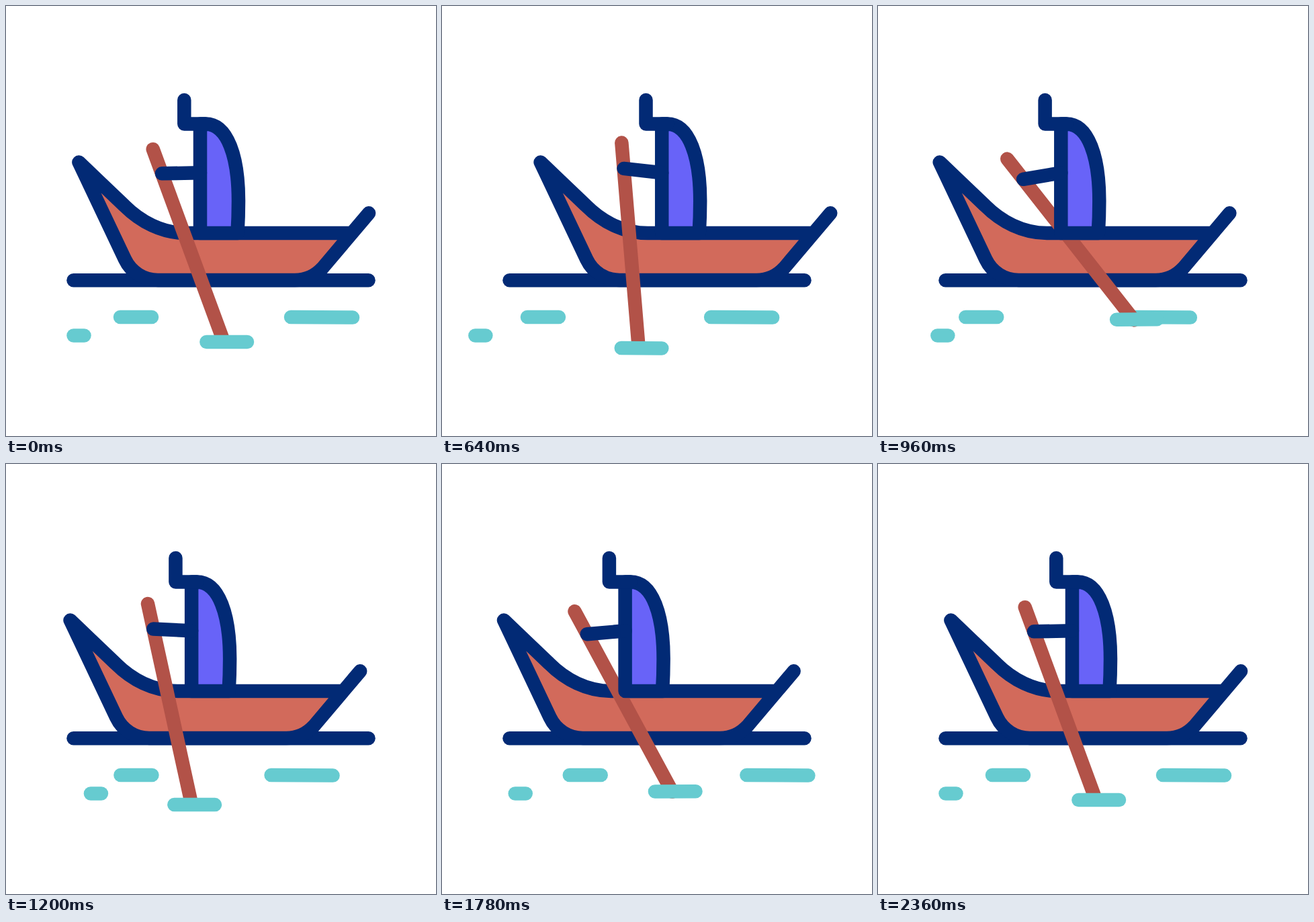
Animation, 640 px wide and 640 px high, one loop 2400 ms. Source, as an HTML page:

```html
<!DOCTYPE html>
<html lang="en">
<head>
<meta charset="utf-8">
<title>Rowing boat</title>
<style>
  html, body { margin: 0; height: 100%; overflow: hidden; background: #fff; }
  svg { display: block; width: 100vw; height: 100vh; }
  path { fill: none; stroke: #022a75; stroke-width: 20.5; stroke-linecap: round; stroke-linejoin: round; }
  .water { stroke: #66cbd0; }
  .wood { stroke: #b25248; }
</style>
</head>
<body>
<svg viewBox="0 0 640 640">
  <path class="water wave" d="M100.5 490.5H116.5"/>
  <path class="water wave" d="M170 463H217"/>
  <path class="water wave" d="M424 463L516 463.6"/>
  <path d="M100.5 408.3H539.5"/>
  <g id="boat">
    <path style="fill:#d26a5b;stroke:none" d="M108.5 232.5L177 377C186 396 205 408 226 408H430C446 408 461 401 471 390L515 338H268C232 338 200 321 176 297Z"/>
    <path d="M512 338H268C232 338 200 321 176 297L108.5 232.5L177 377C186 396 205 408 226 408H430C446 408 461 401 471 390L540 308.3"/>
    <path id="oar" class="wood" d="M0 -38.5V266.5"/>
    <path style="fill:#6863f8" d="M289 338V175.5H297C330 175.5 346 225 346 290Q346 314 344.5 338Z"/>
    <path d="M265.3 140V175.5H297"/>
    <path id="arm" d="M0 0H-57"/>
    <path id="splash" class="water" d="M-30.3 0H30.3"/>
  </g>
</svg>
<script>
const FRAME = 20, FRAMES = 120, RAD = Math.PI / 180;
const $ = id => document.getElementById(id);
const waves = document.querySelectorAll('.wave');

// Keys are [frame, value] pairs, eased in and out between neighbours.
const boatKeys = [[0, 0], [27.8, 43.7], [51.3, -20], [73, 0], [95, -20], [118, 0]];
const oarKeys = [[0, 21.1], [20.5, -14], [48.5, 39.1], [72, -14], [95.5, 39.1], [118, 21.1]];
const waveKeys = [[0, 0], [31.5, -51.2], [66, 32], [100.5, 0]];
const waveDelay = 8.5;

function valueAt(keys, frame) {
  if (frame <= keys[0][0]) return keys[0][1];
  for (let i = 1; i < keys.length; i++) {
    const [start, from] = keys[i - 1], [end, to] = keys[i];
    if (frame < end) {
      const s = (frame - start) / (end - start);
      return from + (to - from) * s * s * (3 - 2 * s);
    }
  }
  return keys[keys.length - 1][1];
}

function place(el, x, y, angle = 0) {
  el.setAttribute('transform', `translate(${x} ${y}) rotate(${angle})`);
}

function draw(now) {
  const frame = now / FRAME % FRAMES;
  waves.forEach((wave, i) => place(wave, valueAt(waveKeys, frame - i * waveDelay), 0));
  place($('boat'), valueAt(boatKeys, frame), 0);

  const swing = valueAt(oarKeys, frame);
  const lift = 1 + 0.48 * (swing - 21.1);
  const handX = 289 - 57 * Math.cos(lift * RAD);
  const handY = 248.3 + 57 * Math.sin(lift * RAD);
  place($('arm'), 289, 248.3, -lift);
  place($('oar'), handX, handY, 0.9 - swing);
  place($('splash'),
    handX + 268.6 * Math.sin(swing * RAD),
    handY + 268.6 * Math.cos(swing * RAD),
    (21.1 - swing) * 0.025);
  requestAnimationFrame(() => draw(performance.now()));
}
draw(performance.now());
</script>
</body>
</html>
```
